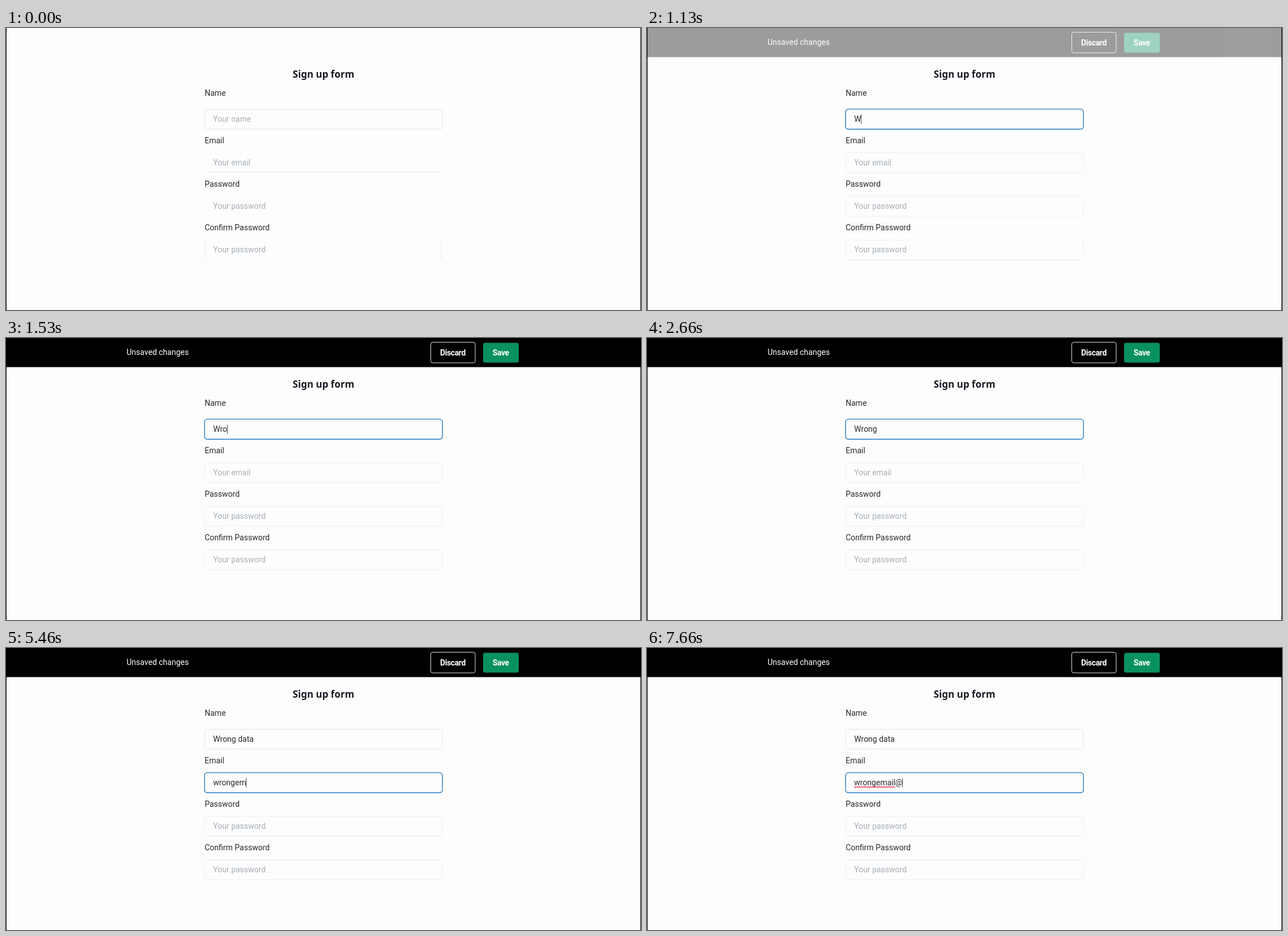
Recreate the animation shown at these times as an HTML page. Size 1122x499 px, loop 8 s.

```html
<!DOCTYPE html>
<html lang="en">
<head>
<meta charset="utf-8">
<title>Sign up form</title>
<style>
  html, body { margin: 0; width: 100%; height: 100%; overflow: hidden; background: #fdfdfd; }
  svg { display: block; width: 100vw; height: 100vh; }
  text { font: 14px Roboto, sans-serif; fill: #292a2f; white-space: pre; }
  .title { font: 600 17px "Noto Sans", sans-serif; fill: #1a1b25; }
  .placeholder { fill: #a6afb7; }
  #bar text { fill: #fff; }
  #bar .button { font-weight: 600; letter-spacing: -.4px; }
  .box, .focus { fill: none; }
  .box { stroke: #eceef0; }
  .focus { stroke: #438fc9; stroke-width: 1.6; opacity: 0; }
</style>
</head>
<body>
<svg viewBox="0 0 1122 499">
  <rect width="1122" height="499" fill="#fdfdfd"/>
  <g id="bar">
    <rect width="1122" height="51.5"/>
    <text x="213" y="30">Unsaved changes</text>
    <rect x="750.5" y="7.5" width="78.5" height="36.5" rx="3.5" fill="none" stroke="#e4e4e4"/>
    <text class="button" x="789.5" y="31" text-anchor="middle">Discard</text>
    <rect x="843" y="8.5" width="63" height="35" rx="3.5" fill="#0a9160"/>
    <text class="button" x="874.3" y="31" text-anchor="middle">Save</text>
  </g>
  <text class="title" x="561" y="88" text-anchor="middle">Sign up form</text>
  <g id="fields"></g>
  <path id="traces" d="M357 255.5H767M352.5 376V411M769.5 376V411" stroke="#f3f3f4" stroke-width="2"/>
  <path id="squiggle" fill="none" stroke="#e0283c" stroke-width="1.2"/>
  <rect id="caret" width="1" height="17" fill="#55565a"/>
  <path d="M.5 0V499M1121.5 0V499" stroke="#000"/>
</svg>
<script>
const LOOP = 8000, BLINK = 545, TEXT_X = 366;
const NAME_FOCUS = 110, EMAIL_FOCUS = 3580, SPELLCHECK = 7650;

const $ = id => document.getElementById(id);
const ramp = (t, start, length) => Math.min(1, Math.max(0, (t - start) / length));

function make(parent, tag, attributes, content = '') {
  const node = document.createElementNS('http://www.w3.org/2000/svg', tag);
  for (const key in attributes) node.setAttribute(key, attributes[key]);
  node.textContent = content;
  return parent.appendChild(node);
}

function makeField(label, hint, labelY, top) {
  const parent = $('fields');
  make(parent, 'text', { x: 351, y: labelY }, label);
  const box = make(parent, 'rect',
    { class: 'box', x: 351, y: top + .5, width: 420, height: 35, rx: 4.5 });
  const focus = make(parent, 'rect',
    { class: 'focus', x: 350.8, y: top, width: 420.4, height: 35.6, rx: 5 });
  const text = make(parent, 'text', { x: TEXT_X, y: top + 22.5 }, hint);
  return { hint, top, box, focus, text };
}

const fields = [
  makeField('Name', 'Your name', 120, 143.5),
  makeField('Email', 'Your email', 204, 220.5),
  makeField('Password', 'Your password', 281, 297.5),
  makeField('Confirm Password', 'Your password', 358, 374.5)
];
const [nameField, emailField] = fields;
nameField.box.style.stroke = '#e0e5e8';

const nameTyping = {
  text: 'Wrong data',
  times: [1055, 1230, 1520, 1795, 2059, 2855, 2995, 3125, 3325, 3455]
};
const emailTyping = {
  text: 'wrongemail@',
  times: [4395, 4525, 4795, 4995, 5125, 5325, 5455, 5655, 5725, 5980, 7595]
};

function show(field, value) {
  field.text.textContent = value || field.hint;
  field.text.setAttribute('class', value ? '' : 'placeholder');
}

function typeInto(field, { text, times }, t) {
  const count = times.filter(time => time <= t).length;
  const value = text.slice(0, count);
  show(field, value);
  return { width: value ? field.text.getComputedTextLength() : 0, last: times[count - 1] || 0 };
}

function drawSquiggle() {
  const width = emailField.text.getSubStringLength(0, 10);
  let d = `M${TEXT_X} 246`;
  for (let x = 0; x + 4 <= width; x += 4) d += 'q1 -2 2 0t2 0';
  $('squiggle').setAttribute('d', d);
}

function draw(t) {
  const bar = ramp(t, 1052, 370);
  $('bar').style.opacity = 1 - (1 - bar) ** 2;

  const nameState = typeInto(nameField, nameTyping, t);
  const emailState = typeInto(emailField, emailTyping, t);
  const switched = ramp(t, EMAIL_FOCUS, 120);
  nameField.focus.style.opacity = ramp(t, NAME_FOCUS - 40, 120) * (1 - switched);
  emailField.focus.style.opacity = switched;

  const reveal = ramp(t, 60, 340);
  fields.slice(1).forEach(field => field.box.style.opacity = reveal);
  $('traces').style.opacity = 1 - reveal;

  const onEmail = t >= EMAIL_FOCUS;
  const field = onEmail ? emailField : nameField;
  const state = onEmail ? emailState : nameState;
  const since = t - Math.max(state.last, onEmail ? EMAIL_FOCUS : NAME_FOCUS);
  $('caret').style.opacity = since >= 0 && Math.floor(since / BLINK) % 2 === 0 ? 1 : 0;
  $('caret').setAttribute('x', Math.round(TEXT_X + state.width));
  $('caret').setAttribute('y', field.top + 9.5);

  const misspelt = t >= SPELLCHECK;
  $('squiggle').style.opacity = misspelt ? 1 : 0;
  if (misspelt) drawSquiggle();
}

show(fields[2], '');
show(fields[3], '');
const start = performance.now();
function tick() {
  draw((performance.now() - start) % LOOP);
  requestAnimationFrame(tick);
}
tick();
</script>
</body>
</html>
```
